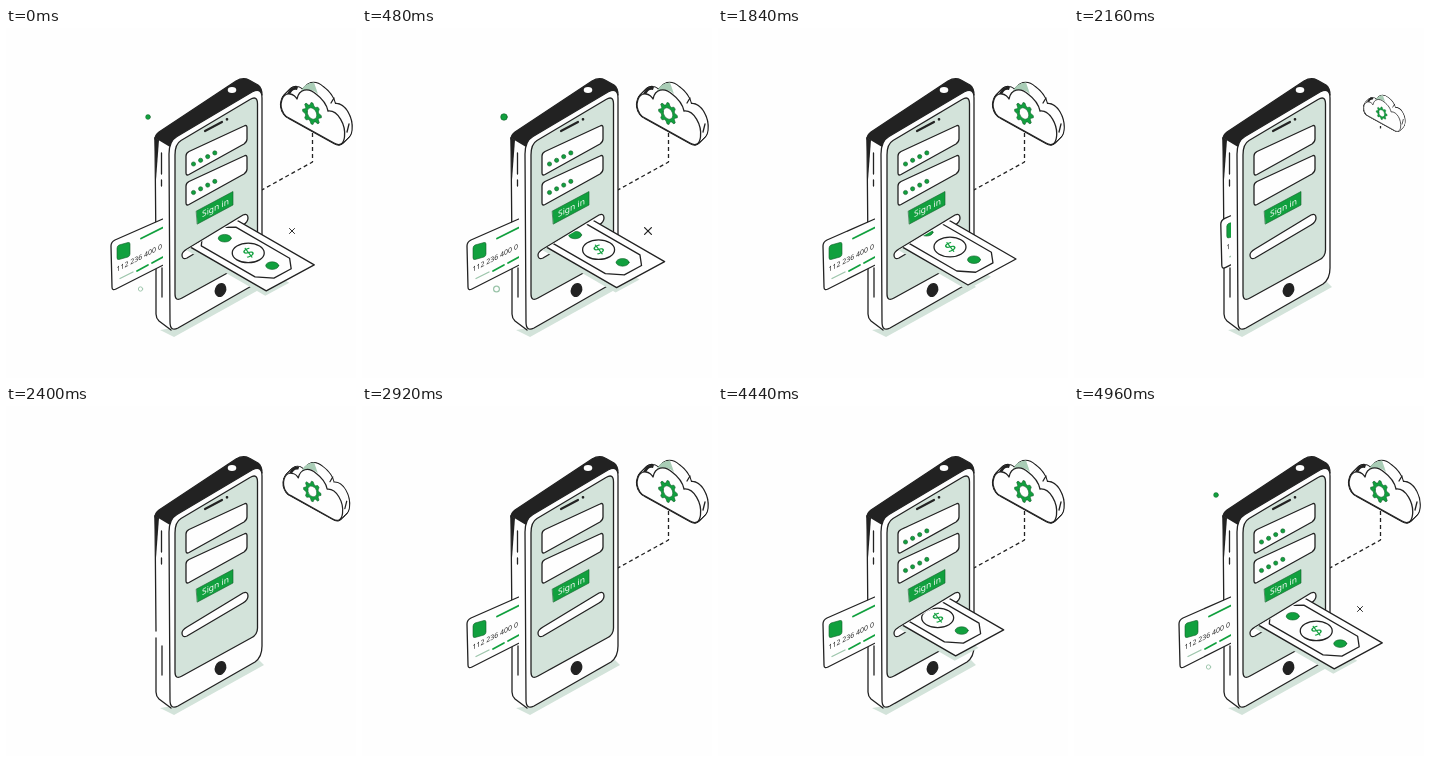
These frames come from a looping animation (350x350 px, 5000 ms). An HTML page:

```html
<!DOCTYPE html>
<html lang="en">
<head>
<meta charset="utf-8">
<title>Mobile payment</title>
<style>
  html, body { margin: 0; width: 100%; height: 100%; overflow: hidden; background: #fefefe; }
  svg { display: block; width: 100vw; height: 100vh; }
  text { font-family: "Noto Sans", sans-serif; stroke: none; }
  .line { fill: none; stroke: #222; stroke-width: 1.3; stroke-linecap: round; stroke-linejoin: round; }
  .white { fill: #fefefe; }
  .pale { fill: #d3e3da; }
  .sage { fill: #a9cdb6; }
  .green { fill: #11a03e; }
  .black { fill: #222; }
  .accent { stroke: #11a03e; }
  .soft { stroke: #9cc5ab; }
  .rim { stroke: #135e2b; stroke-width: .6; }
  .flat { vector-effect: non-scaling-stroke; }
</style>
</head>
<body>
<svg viewBox="0 0 350 350">
  <defs>
    <clipPath id="cardClip"><path d="M0 150H157V300H0z"/></clipPath>
    <clipPath id="billClip"><path d="M178 223.500L238 189L350 189V350H178z"/></clipPath>
    <mask id="linkMask" maskUnits="userSpaceOnUse" x="240" y="80" width="90" height="100">
      <path id="reveal" d="M306.500 98V134L254 163" fill="none" stroke="#fff" stroke-width="5" pathLength="1" stroke-dasharray="1 2"/>
    </mask>
    <path id="puff" d="M278 86C272 77 276 65 284 66C287 66 290 69 291 71C293 61 302 59 310 66C318 72 321 78 322 83C332 82 340 97 338.500 109C337.500 117 333 118 328 115L283 90Q280 89 278 86z"/>
  </defs>

  <path class="pale" d="M154 302L168 309L258 259L253 254L167 300z"/>
  <path class="line" mask="url(#linkMask)" stroke-dasharray="4 3" style="stroke-linecap:butt" d="M306.500 98V134L254 163"/>

  <!-- phone -->
  <g class="line">
    <path class="black" d="M149 111Q149 107 153 104L230 53Q237 49 243 52L252 57Q256 60 256 67L168 122L163 120z"/>
    <path class="white" stroke="none" d="M149 110L164 119V302L153 293Q150 290 150 286z"/>
    <path d="M149 110L150 225M150 232V286Q150 290 153 293L165 302M155.500 125V146M155.500 152V158M156 240V269"/>
    <path class="black" stroke="none" d="M148.500 109L153 112L150 152z"/>
    <path class="white" d="M163 126Q163 113 171 108.500L246 64Q256 59 256 70V240Q256 251 249 256L172 300Q164 304 164 294z"/>
    <path class="pale" d="M169 127Q169 116 175 112.500L244 71.500Q251.500 67 251.500 76V222Q251.500 229 245 232L176 270Q169 274 169 266z"/>
    <path d="M199 103L216 94" style="stroke-width:2.200"/>
    <circle class="black" cx="221" cy="91.300" r=".7"/>
    <ellipse class="white" stroke="none" cx="226" cy="62" rx="4.300" ry="3"/>
    <ellipse class="black" cx="214.500" cy="262" rx="5" ry="6.500" transform="rotate(22 214.500 262)"/>
    <path class="white" d="M180 128Q180 125 183 123.500L238 98Q241 96.500 241 99.500V111Q241 114 238 116L183 146.500Q180 148 180 145z"/>
    <path class="white" d="M180 158Q180 155 183 153.500L238 128Q241 126.500 241 129.500V141Q241 144 238 146L183 176.500Q180 178 180 175z"/>
    <path class="green rim" d="M190.500 183L227 163.500V177L191.500 196z"/>
    <path class="white" d="M181 221L237 187Q242 185 242 190Q242 194 237 197L181 230Q176 232 176 227Q176 224 181 221z"/>
  </g>
  <text fill="#fff" font-size="8.5" transform="matrix(1 -.5 0 1 196 189.300)">Sign in</text>
  <g id="dots" class="green rim"></g>

  <!-- card -->
  <g clip-path="url(#cardClip)">
    <g id="card" class="line">
      <path class="white" d="M105 218Q105 214 109 212L175 183V228L110 261Q106 263 106 259z"/>
      <path class="green rim" d="M111 220Q111 218 113 217L122 214.500Q124 214 124 216V226Q124 228 122 229L113 231.500Q111 232 111 230z"/>
      <path class="accent" style="stroke-width:1.700" d="M135 210.500L170 193M131 243L142 237M146 235L170 222"/>
      <path class="soft" d="M114 250.500L127 244"/>
      <text fill="#222" font-size="7" transform="matrix(1 -.52 0 1 110.500 244)">112 236 400 0</text>
    </g>
  </g>

  <!-- banknote -->
  <g clip-path="url(#billClip)">
    <g id="bill" class="line">
      <g transform="matrix(64 37 48 -26 186 220)">
        <path class="pale" stroke="none" transform="translate(.06 -.1)" d="M-.32 0H1V.5H-.32z"/>
        <path class="white flat" d="M-.32 0H1V1H-.32z"/>
        <path class="flat" d="M-.12 .14H.72L.88 .32V.68L.72 .86H-.12L-.24 .68V.32z"/>
      </g>
      <ellipse class="white" cx="232" cy="219" rx="16" ry="9.800"/>
      <g class="green">
        <ellipse class="rim" cx="256" cy="231.700" rx="6.500" ry="3.800"/>
        <ellipse class="rim" cx="208.500" cy="204.300" rx="6.500" ry="3.800"/>
        <text font-size="18" text-anchor="middle" transform="matrix(.87 -.47 .5 .65 235.500 223)">$</text>
      </g>
    </g>
  </g>

  <!-- cloud -->
  <g id="cloud" class="line">
    <g id="depth"></g>
    <path class="sage" stroke="none" d="M295 63Q298 55 308 54.500L312 66Q303 58 296 66z"/>
    <path class="black" stroke="none" d="M281 66Q285 57 292 59L291 62Q286 61 284 67z"/>
    <use href="#puff" class="white"/>
    <path d="M328 70L325 75M343 96L341 104"/>
    <path id="gear" class="green rim" fill-rule="evenodd" transform="matrix(.87 .3 0 1 306 85.500)"/>
  </g>

  <!-- small marks -->
  <g class="line">
    <circle class="mark green rim" data-at="142,89" r="3.400"/>
    <path class="mark" data-at="286,203" d="M-3.500-3.500L3.500 3.500M-3.500 3.500L3.500-3.500"/>
    <circle class="mark soft" data-at="134.500,261" r="3"/>
  </g>
</svg>
<script>
const LOOP = 5000;
const get = id => document.getElementById(id);
const ease = (t, from, to) => {
  const x = Math.min(1, Math.max(0, (t - from) / (to - from)));
  return x * x * (3 - 2 * x);
};
const move = (node, value) => node.setAttribute('transform', value);

function add(parent, tag, attrs) {
  const node = document.createElementNS('http://www.w3.org/2000/svg', tag);
  for (const key in attrs) node.setAttribute(key, attrs[key]);
  return parent.appendChild(node);
}

// Extrude the cloud: outlines first, then white on top
for (const stroke of ['#222', 'none'])
  for (let k = 7; k >= 0; k -= .5)
    add(get('depth'), 'use', { href: '#puff', x: k, y: -k, stroke, 'stroke-width': 2.2, class: 'white' });

let gear = '';
for (let i = 0; i < 32; i++) {
  const angle = (i - 1.5) * Math.PI / 16;
  const r = i % 4 === 1 || i % 4 === 2 ? 10.8 : 8.2;
  gear += `${i ? 'L' : 'M'}${r * Math.cos(angle)} ${r * Math.sin(angle)}`;
}
get('gear').setAttribute('d', gear + 'zM-5.500 0a5.500 5.500 0 1 0 11 0a5.500 5.500 0 1 0-11 0z');

const dots = Array.from({ length: 8 }, (_, i) => add(get('dots'), 'circle', {
  cx: 187.5 + i % 4 * 7.1, cy: 136 - i % 4 * 3.7 + (i > 3 ? 28.5 : 0), r: 2.1
}));
const marks = [...document.querySelectorAll('.mark')];

function draw(t) {
  // Each part leaves, then comes back later in the loop
  const shown = (out, outEnd, back, backEnd) => 1 - ease(t, out, outEnd) + ease(t, back, backEnd);

  const slide = .16 * (1 - ease(t, 0, 900)) - 1.15 * ease(t, 1880, 2140) + 1.31 * ease(t, 3940, 4700);
  move(get('bill'), `translate(${64 * slide} ${37 * slide})`);

  const hidden = 1 - shown(2000, 2240, 2540, 2880);
  move(get('card'), `translate(${56 * hidden} ${-29 * hidden})`);

  const link = shown(1980, 2180, 2430, 2800);
  get('reveal').setAttribute('stroke-dashoffset', 1 - link);
  get('reveal').style.visibility = link > 0 ? 'visible' : 'hidden';

  move(get('cloud'), `translate(310 85) scale(${shown(2090, 2250, 2250, 2430)}) translate(-310 -85)`);

  dots.forEach((dot, i) => {
    const on = t < 2120 - i * 30 || t >= 3040 + i * 110;
    dot.style.visibility = on ? 'visible' : 'hidden';
  });

  const size = .72 * ease(t, 4500, 4900) + (t < 4500 ? .72 + .28 * ease(t, 0, 600) - ease(t, 1300, 1700) : 0);
  marks.forEach(mark => move(mark, `translate(${mark.dataset.at}) scale(${size})`));
}

function tick() {
  draw(performance.now() % LOOP);
  requestAnimationFrame(tick);
}
tick();
</script>
</body>
</html>
```
